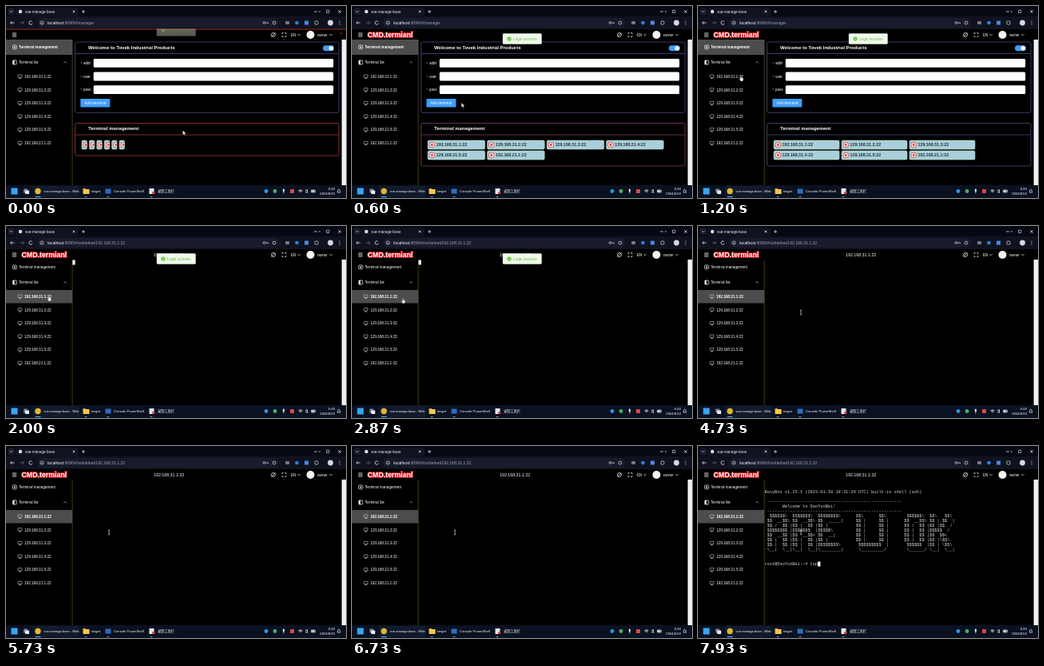
Recreate the animation shown at these times as an HTML page with a canvas. Size 426 by 240 pixels, loop 8000 ms.

```html
<!DOCTYPE html>
<html lang="en">
<head>
<meta charset="utf-8">
<title>Terminal manager</title>
<style>
html, body { margin: 0; width: 100%; height: 100%; overflow: hidden; background: #000; }
canvas { display: block; width: 100vw; height: 100vh; }
</style>
</head>
<body>
<canvas id="stage"></canvas>
<script>
const W = 426, H = 240, LOOP = 8000;
const OPEN_PAGE = 1600, FOCUS = 3600, BANNER = 7070;
const canvas = document.getElementById('stage');
const ctx = canvas.getContext('2d');
const SANS = '"Liberation Sans", "Noto Sans CJK SC", "Noto Sans CJK", sans-serif';
const MONO = '"Liberation Mono", monospace';
const hosts = ['192.168.31.1', '129.168.31.2', '129.168.31.3', '129.168.31.4', '129.168.31.5', '192.168.21.1'].map(ip => ip + ':22');
const prompt = 'root@DaoYunBei:~# ';
const rule = ' ' + '-'.repeat(53);
const banner = [
  'BusyBox v1.25.1 (2023-01-30 10:31:26 UTC) built-in shell (ash)',
  '',
  rule,
  '       Welcome to DaoYunBei!',
  rule,
  String.raw`  $$$$$$\  $$$$$$$\  $$$$$$$$\      $$\      $$\        $$$$$$\  $$\   $$\ `,
  String.raw` $$  __$$\ $$  __$$\ $$  _____|     $$ |     $$ |      $$  __$$\ $$ | $$  |`,
  String.raw` $$ /  $$ |$$ |  $$ |$$ |           $$ |     $$ |      $$ /  $$ |$$ |$$  /`,
  String.raw` $$$$$$$$ |$$$$$$$  |$$$$$\         $$ |     $$ |      $$ |  $$ |$$$$$  /`,
  String.raw` $$  __$$ |$$  __$$< $$  __|        $$ |     $$ |      $$ |  $$ |$$  $$<`,
  String.raw` $$ |  $$ |$$ |  $$ |$$ |           $$ |     $$ |      $$ |  $$ |$$ |\$$\ `,
  String.raw` $$ |  $$ |$$ |  $$ |$$$$$$$$\       $$$$$$$$$  |       $$$$$$  |$$ | \$$\ `,
  String.raw` \__|  \__|\__|  \__|\________|      \_________/        \______/ \__|  \__|`
];

const clamp = v => Math.max(0, Math.min(1, v));
const ease = v => v * v * (3 - 2 * v);
const ramp = (t, from, to) => ease(clamp((t - from) / (to - from)));
const mix = (a, b, k) => a + (b - a) * k;

function box(x, y, w, h, fill, r = 0) {
  ctx.fillStyle = fill;
  ctx.beginPath();
  ctx.roundRect(x, y, w, h, r);
  ctx.fill();
}
function frame(x, y, w, h, color, r = 0, width = 0.7) {
  ctx.strokeStyle = color;
  ctx.lineWidth = width;
  ctx.beginPath();
  ctx.roundRect(x, y, w, h, r);
  ctx.stroke();
}
function disc(x, y, r, fill) {
  ctx.fillStyle = fill;
  ctx.beginPath();
  ctx.arc(x, y, r, 0, 7);
  ctx.fill();
}
function ring(x, y, r, color, from = 0, to = 6.3) {
  ctx.strokeStyle = color;
  ctx.lineWidth = 0.8;
  ctx.beginPath();
  ctx.arc(x, y, r, from, to);
  ctx.stroke();
}
// Moves through offsets [x, y] relative to an origin
function line(x, y, points, color = '#ddd', width = 0.8) {
  ctx.strokeStyle = color;
  ctx.lineWidth = width;
  ctx.beginPath();
  points.forEach(([dx, dy]) => ctx.lineTo(x + dx, y + dy));
  ctx.stroke();
}
function text(str, x, y, size, color = '#fff', weight = 400, align = 'left', family = SANS) {
  ctx.font = `${weight} ${size}px ${family}`;
  ctx.textAlign = align;
  ctx.textBaseline = 'alphabetic';
  ctx.fillStyle = color;
  ctx.fillText(str, x, y + size * 0.36);
  return ctx.measureText(str).width;
}
const caret = (x, y, up = 1, color) => line(x, y, [[-1.6, -0.8 * up], [0, 0.8 * up], [1.6, -0.8 * up]], color);
const cross = (x, y, s) => {
  line(x, y, [[-s, -s], [s, s]]);
  line(x, y, [[-s, s], [s, -s]]);
};

function browserBar(terminal) {
  box(0, 0, W, 13, '#060812');
  box(2, 2.5, 9, 9, '#171b2c', 2.5);
  caret(6.5, 7);
  box(12, 2, 79, 12, '#10131f', 3);
  disc(18, 7, 2.2, '#ddd');
  text('vue-manage-base', 24, 7, 4.6, '#e6e6ee');
  cross(85, 7, 1.3);
  line(97, 7, [[-2, 0], [2, 0]]);
  line(97, 7, [[0, -2], [0, 2]]);
  line(394, 7, [[-2, 0], [0, 0]]);
  line(388, 7, [[-2, 0], [2, 0]]);
  frame(401.5, 5.2, 3.4, 3.4, '#ddd', 0.5);
  cross(418, 7, 1.7);

  box(0, 13, W, 16, '#10131f');
  box(39, 15, 303, 12, '#171b2c', 6);
  line(8, 21, [[2.5, 0], [-2.5, 0], [-0.5, -2]]);
  line(8, 21, [[-2.5, 0], [-0.5, 2]]);
  line(20, 21, [[-2.5, 0], [2.5, 0], [0.5, -2]], '#666');
  line(20, 21, [[2.5, 0], [0.5, 2]], '#666');
  ring(31, 21, 2.2, '#ddd', 0.3, 5.6);
  ring(45, 21, 2.1, '#ccc');
  line(45, 21, [[0, -0.2], [0, 1.2]], '#ccc');
  const hostWidth = text('localhost', 52, 21, 5.1);
  text(':9090/#/' + (terminal ? 'sshtelnet/' + hosts[0] : 'manager'), 52 + hostWidth, 21, 5.1, '#a0a3ae');
  ring(323.5, 21, 1.4, '#ccc');
  line(325, 21, [[0, 0], [3.5, 0], [3.5, 1.2]], '#ccc');
  ring(336, 21, 1.9, '#ccc');
  box(350, 19, 5, 4, '#747987', 1);
  disc(364.5, 21, 2.3, '#2f7ee0');
  box(374, 18.5, 5, 5, '#4a86e8', 0.5);
  frame(387, 19, 4, 4, '#ddd', 0.8);
  disc(406.5, 21, 3.4, '#d8d8dc');
  [-2, 0, 2].forEach(d => disc(418, 21 + d, 0.6, '#ddd'));
}

function header(t, terminal) {
  box(0, 29, W, 13, '#000');
  [-2, 0, 2].forEach(d => line(10.5, 36 + d, [[-2.7, 0], [2.7, 0]], '#fff'));
  ctx.save();
  ctx.globalAlpha = ramp(t, 80, 600);
  ctx.font = `700 8.8px ${SANS}`;
  ctx.textAlign = 'left';
  ctx.lineJoin = 'round';
  ctx.lineWidth = 2;
  ctx.strokeStyle = '#c8141c';
  ctx.strokeText('CMD.termianl', 19.5, 38.7);
  text('CMD.termianl', 19.5, 35.53, 8.8, '#fff', 700);
  ctx.restore();
  if (terminal) text(hosts[0], 185, 36, 5.3);
  ring(335, 36, 2.5, '#eee');
  line(335, 36, [[-2.5, 2.5], [2.5, -2.5]], '#eee');
  for (const [sx, sy] of [[-1, -1], [1, -1], [1, 1], [-1, 1]])
    line(348.5, 36, [[sx * 0.9, sy * 2.4], [sx * 2.4, sy * 2.4], [sx * 2.4, sy * 0.9]], '#eee');
  text('EN', 357, 36, 4.65);
  caret(367, 36);
  disc(381.5, 36, 5, '#f4f4f4');
  text('owner', 390, 36, 4.65);
  caret(407, 36);
}

// Red page-load bar and spinner, fading out once a page is ready
function loadBar(t) {
  const ready = t < OPEN_PAGE ? 50 : OPEN_PAGE + 100;
  ctx.save();
  ctx.globalAlpha = 1 - ramp(t, ready, ready + 350);
  box(0, 28.7, W, 0.8, '#c8321c');
  const turn = t / 400 * 2 * Math.PI - 1.6;
  ring(418, 35.5, 2.6, '#d01a1a', turn, turn + 2.4);
  ctx.restore();
}

function sidebar(terminal) {
  box(0, 42, 83, 182, '#000');
  box(0, terminal ? 80 : 42, 83, terminal ? 16.6 : 19, '#4c4c4f');
  text('Terminal management', 16, 51.5, 4.65, '#fff', terminal ? 400 : 700);
  frame(8.5, 49, 4.8, 4.8, '#fff', 1);
  disc(10.9, 51.4, 1, '#fff');
  frame(8.7, 68, 4.5, 5, '#fff', 0.4);
  box(8.7, 68, 1.8, 5, '#fff');
  text('Terminal list', 16, 70.5, 4.65, '#fff');
  caret(74, 70.5, -1, '#aaa');
  hosts.forEach((host, i) => {
    const y = 88.2 + i * 16.65;
    frame(15, y - 2.2, 4.8, 3.3, '#ccc', 0.3, 0.6);
    line(17.4, y, [[0, 1.1], [0, 2.2]], '#ccc', 0.6);
    line(17.4, y, [[-1.5, 2.3], [1.5, 2.3]], '#ccc', 0.6);
    text(host, 23, y, 4.65, '#fff', terminal && i === 0 ? 700 : 400);
  });
  box(82.7, 42, 0.7, 182, '#5d5629');
}

function scrollbar() {
  box(420, 42, 1, 182, '#5d5629');
  box(421, 42, 5, 182, '#efeff6');
}

function panel(y, height, title, color) {
  frame(86.5, y, 330.5, height, color, 2);
  line(86.5, y + 14.5, [[0, 0], [330.5, 0]], color, 0.7);
  text(title, 103, y + 6.8, 6, '#fff', 700);
}

function chips(t) {
  const width = mix(5.3, 82, ramp(t, -60, 800));
  const columns = Math.min(6, Math.floor(313 / (width + 3)));
  hosts.forEach((host, i) => {
    const x = 95 + (i % columns) * (width + 3);
    const y = 168 + Math.floor(i / columns) * 13;
    ctx.save();
    box(x, y, width, 11, '#a9cfdb', 1.5);
    ctx.clip();
    disc(x + 5.2, y + 5.5, 3.7, '#d94a48');
    disc(x + 5.2, y + 5.5, 2.9, '#f6e4e2');
    box(x + 4, y + 4, 2.4, 3, '#d94a48', 0.4);
    text(host, x + 10.5, y + 5.3, 5.3, '#26343a', 700);
    ctx.restore();
    frame(x, y, width, 11, '#b9dfc5', 1.5, 0.6);
  });
  return Math.ceil(hosts.length / columns);
}

function managePage(t) {
  const violet = '#55509a';
  panel(45, 88.3, 'Welcome to Tovek Industrial Products', violet);
  box(397, 49.3, 14, 7, '#409eff', 3.5);
  disc(407.3, 52.8, 2.7, '#fff');
  ['addr', 'user', 'pass'].forEach((label, i) => {
    const y = 71.4 + i * 16.6;
    text('*', 93.3, y + 0.8, 4.8, '#f56c6c');
    text(label, 97, y, 4.5);
    box(109.7, y - 5.4, 300.5, 10.8, '#fff', 1.5);
  });
  box(93.3, 116, 37, 10.5, '#409eff', 1.3);
  text('Add terminal', 111.8, 121.2, 4.8, '#fff', 400, 'center');
  const rows = chips(t);
  const hover = 1 - ramp(t, 450, 800);
  const border = `rgb(${mix(85, 185, hover)},${mix(80, 62, hover)},${mix(154, 62, hover)})`;
  panel(146.5, 27.5 + rows * 13, 'Terminal management', border);
}

function terminalPage(t) {
  const cell = 3.18, left = 83.4;
  const write = (str, row) => text(str, left, 45.4 + row * 6, cell / 0.6, '#d0d0d0', 400, 'left', MONO);
  let row = 0, column = 0;
  if (t >= BANNER) {
    banner.forEach((str, i) => write(str, i + 2));
    const typed = 'top'.slice(0, [7530, 7670, 7800].filter(at => t >= at).length);
    row = 17;
    column = (prompt + typed).length;
    write(prompt + typed, row);
  }
  const blinkStart = t >= BANNER ? BANNER : FOCUS;
  const visible = t < FOCUS || t >= 7530 || (t - blinkStart) % 1200 < 600;
  if (visible) box(left + column * cell, 42.5 + row * 6, cell, 6, '#fff');
}

function toast(t) {
  const shown = ramp(t, -150, 220) * (1 - ramp(t, 2950, 3250));
  if (!shown) return;
  ctx.save();
  ctx.beginPath();
  ctx.rect(0, 28.5, W, 100);
  ctx.clip();
  ctx.globalAlpha = shown;
  ctx.translate(0, mix(-16, 0, shown));
  box(189, 34.5, 48.5, 13, '#f0f9eb', 1.3);
  frame(189, 34.5, 48.5, 13, '#e1f3d8', 1.3, 0.4);
  disc(197, 41, 2.6, '#67c23a');
  line(197, 41, [[-1.2, 0], [-0.2, 1], [1.3, -0.9]], '#fff', 0.6);
  text('Login success', 202, 41, 4.7, '#67c23a');
  ctx.restore();
}

function taskbar() {
  const y = 231.5;
  box(0, 224, W, 16, '#0a1222');
  box(34, 225, 58, 14, '#121b2d', 2);
  box(6.5, y - 4, 8, 8, '#3aa5ee');
  box(22, y - 3, 5, 5, '#777f91', 0.6);
  box(24, y - 1, 5, 4.5, '#e6e8ef', 0.6);
  disc(40, y, 3.7, '#dfb735');
  text('vue-manage-base - Web', 47.5, y, 4, '#fff');
  box(96.5, y - 3.5, 3.5, 2, '#d99d2b', 0.5);
  box(96.5, y - 2.5, 8, 6, '#f5c64c', 0.6);
  text('target', 107, y, 4.3);
  box(124.5, y - 3, 7, 6, '#2b6cc0', 0.6);
  text('Console PowerShell', 135, y, 4.2);
  box(179.5, y - 3.5, 6, 7, '#e8eaf0', 0.6);
  disc(184.7, y + 2, 1.8, '#d84545');
  text('录制工具栏', 190, y, 4.2);
  [40, 100, 128, 182].forEach((x, i) => box(x - (i ? 1.5 : 3.5), 238, i ? 3 : 7, 1, i ? '#8b94a6' : '#55b8f0', 0.5));
  disc(326, y, 2.4, '#2f93e8');
  disc(337, y, 2.4, '#42b46c');
  box(346.8, y - 3, 2.2, 4, '#ddd', 1.1);
  line(347.9, y, [[0, 1], [0, 3]]);
  box(356, y - 2.5, 5, 5, '#d54949', 0.6);
  [1, 2.3, 3.6].forEach(r => ring(369, y + 2, r, '#eee', -2.35, -0.8));
  line(376, y, [[-1, -1], [0, -1], [1.5, -2], [1.5, 2], [0, 1], [-1, 1]], '#eee');
  frame(382.5, y - 1.5, 5, 3, '#eee', 0.4);
  box(383, y - 1, 3.5, 2, '#eee');
  text('0:40', 412, 228.8, 4.2, '#fff', 400, 'right');
  text('2024/9/10', 412, 234.8, 4.2, '#fff', 400, 'right');
  line(417, y, [[-2, 1.5], [-1.4, 0.5], [-1.2, -1.5], [0, -2.6], [1.2, -1.5], [1.4, 0.5], [2, 1.5], [-2, 1.5]], '#eee', 0.7);
}

function pointer(t) {
  const toMenu = ramp(t, 200, 1000), toTerminal = ramp(t, 2700, 3450);
  const x = mix(mix(221.5, 53.5, toMenu), 129, toTerminal);
  const y = mix(mix(155.5, 87, toMenu), 108, toTerminal);
  if (t > 2700 && x > 83) {
    line(x, y, [[-1.2, -2.8], [1.2, -2.8]], '#eee', 0.6);
    line(x, y, [[0, -2.8], [0, 2.8]], '#eee', 0.7);
    line(x, y, [[-1.2, 2.8], [1.2, 2.8]], '#eee', 0.6);
    return;
  }
  const hand = [[0, 0], [0.9, 0.4], [1, 2.6], [3.3, 3.3], [3.2, 5.5], [2.3, 7], [0, 7], [-2, 4.3], [-1.5, 3.7], [-0.5, 4.4]];
  const arrow = [[0, 0], [0, 5.6], [1.3, 4.4], [2.2, 6.3], [3.1, 5.9], [2.2, 4], [4, 4]];
  ctx.beginPath();
  (x < 83 ? hand : arrow).forEach(([dx, dy]) => ctx.lineTo(x + dx, y + dy));
  ctx.closePath();
  ctx.fillStyle = '#fff';
  ctx.fill();
  ctx.strokeStyle = '#222';
  ctx.lineWidth = 0.4;
  ctx.stroke();
}

function draw(t) {
  const terminal = t >= OPEN_PAGE;
  box(0, 0, W, H, '#000');
  browserBar(terminal);
  header(t, terminal);
  sidebar(terminal);
  if (terminal) terminalPage(t);
  else managePage(t);
  scrollbar();
  loadBar(t);
  toast(t);
  taskbar();
  pointer(t);
}

function resize() {
  canvas.width = innerWidth * devicePixelRatio;
  canvas.height = innerHeight * devicePixelRatio;
}
addEventListener('resize', resize);
resize();

const start = performance.now();
function tick() {
  ctx.setTransform(canvas.width / W, 0, 0, canvas.height / H, 0, 0);
  draw((performance.now() - start) % LOOP);
  requestAnimationFrame(tick);
}
tick();
</script>
</body>
</html>
```
